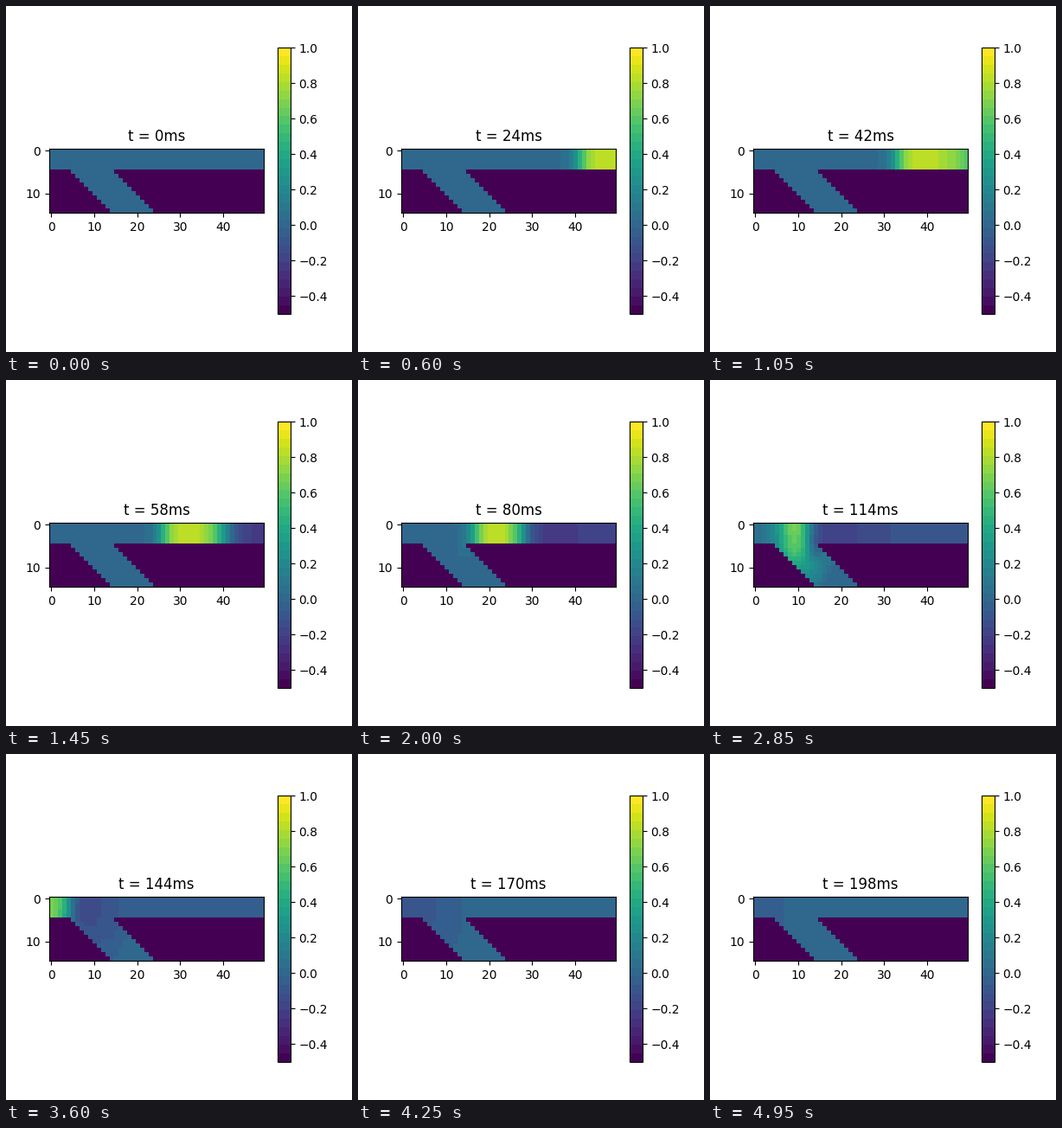
Write a matplotlib script that moves like this. It is 400 by 400 pixels and loops after 5000 ms.

```python
import numpy as np
import matplotlib.pyplot as plt
from matplotlib.animation import FuncAnimation

ROWS, COLS = 15, 50
FRAMES, STEP_MS, INTERVAL = 100, 2, 50
STRIP = 5            # rows of the main strip
CORNER = 14.5        # column where the pulse turns into the side branch
WALL = -0.5


def sigmoid(x):
    return 1 / (1 + np.exp(-np.clip(x, -50, 50)))


def bump(x):
    return np.exp(-x ** 2)


row, col = np.mgrid[0:ROWS, 0:COLS].astype(float)
depth = np.maximum(row - STRIP + 1, 0)
branch = depth > 0
tissue = ~branch | ((col >= row) & (col < row + 10))

# Distance along the strip; in the branch the pulse bends round the corner
x = np.where(branch, CORNER - np.hypot(CORNER - col, depth / 2), col)

# It dies out with depth, faster in the shadow behind the corner
reach = depth + 2 * branch * np.maximum(col - CORNER, 0)
spread = bump(reach / 7.5)

# The pulse runs left at constant speed and is held up at the junction
arrive = 117.7 - 2.28 * x + 13.5 * sigmoid((7.8 - x) / 1.8)
leave = arrive + 22.5 + 18.5 * (x / COLS) ** 3
blur = sigmoid((8 - x) / 3)
rise = 2.9 + 3.2 * blur
fall = 2.6 + 1.2 * blur
height = 0.92 - (0.12 + 0.02 * np.minimum(row, 4)) * bump((x - 8) / 5)

# Undershoot after the pulse and how long it lasts
under = 0.25 * (1 - 0.5 * bump(x / 14))
recover = 35 + 0.75 * np.abs(x - 16)


def potential(t):
    since, after = t - arrive, t - leave
    sag = 1 - 0.0055 * np.clip(since, 0, 30)
    done = sigmoid(after / fall)
    pulse = height * sag * sigmoid(since / rise) * (1 - done)
    dip = under * done * bump(np.maximum(after, 0) / recover)
    v = (pulse - dip) * spread * min(1, t / 6)
    return np.where(tissue, v, WALL)


fig, ax = plt.subplots(figsize=(4, 4), dpi=100)
image = ax.imshow(potential(0), cmap=plt.get_cmap("viridis", 31),
                  vmin=-0.5, vmax=1)
fig.colorbar(image)
title = ax.set_title("t = 0ms")


def update(i):
    t = i * STEP_MS
    image.set_data(potential(t))
    title.set_text(f"t = {t}ms")
    return image, title


anim = FuncAnimation(fig, update, frames=FRAMES, interval=INTERVAL,
                     repeat=True, repeat_delay=0)
plt.show()
```
